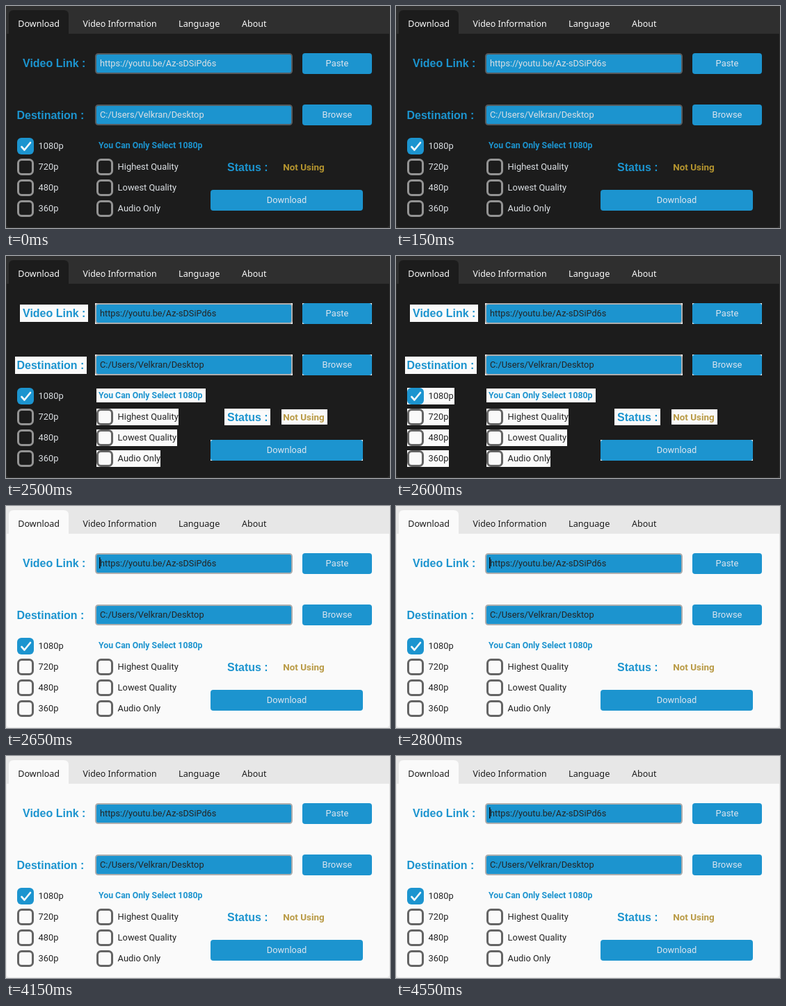
An HTML page for the animation above (4.8 s loop, 552x320 px).

```html
<!DOCTYPE html>
<html lang="en">
<head>
<meta charset="utf-8">
<title>Video downloader theme switch</title>
<style>
  html, body { margin: 0; width: 100%; height: 100%; overflow: hidden; background: #1c1c1c; }
  svg { display: block; width: 552px; height: 320px; }
  g {
    --page: #1c1c1c; --bar: #2f2f2f; --ink: #dce0e4; --tab: #fafafa;
    --edge: #565b5e; --box: #949494; --gold: #b5952f;
  }
  g.light {
    --page: #fafafa; --bar: #e7e7e7; --ink: #242424; --tab: #1c1c1c;
    --edge: #aeaeae; --box: #646464; --gold: #b99a45;
  }
  text { font-family: Roboto, sans-serif; white-space: pre; }
  .tab { font-family: "Noto Sans", sans-serif; fill: var(--tab); }
  .head { font: bold 16px "Liberation Sans", Arial, sans-serif; fill: #1c94cf; }
  .note { font-weight: bold; fill: #1c94cf; }
  .gold { font-weight: bold; fill: var(--gold); }
  .ink { fill: var(--ink); }
  .cap { fill: #dce4ee; text-anchor: middle; }
  .blue { fill: #1c94cf; }
  .page { fill: var(--page); }
  .bar { fill: var(--bar); }
  .back { fill: #fafafa; visibility: hidden; }
  .light .back { visibility: visible; }
  .light .dark { visibility: hidden; }
  .edge { fill: #1c94cf; stroke: var(--edge); stroke-width: 2; }
  .box { fill: none; stroke: var(--box); stroke-width: 3; }
  .tick { fill: none; stroke: #f4f8fb; stroke-width: 2.7; stroke-linecap: round; stroke-linejoin: round; }
</style>
</head>
<body>
<svg id="stage" viewBox="0 0 552 320"></svg>
<script>
const LOOP = 4800, LABELS = 2450, PAGE = 2650;
const stage = document.getElementById('stage');
const parts = [];

function add(parent, name, attrs, text) {
  const el = document.createElementNS('http://www.w3.org/2000/svg', name);
  for (const key in attrs) el.setAttribute(key, attrs[key]);
  if (text) el.textContent = text;
  return parent.appendChild(el);
}

// A group that turns light at the given time.
function group(at) {
  const el = add(stage, 'g', {});
  parts.push({ el, at });
  return el;
}

const rect = (g, cls, x, y, width, height, rx = 0) =>
  add(g, 'rect', { class: cls, x, y, width, height, rx });

const label = (g, cls, x, y, size, str) =>
  add(g, 'text', { class: cls, x, y, 'font-size': size }, str);

function frame() {
  const g = group(PAGE);
  rect(g, 'bar', 0, 0, 552, 320);
  add(g, 'path', { class: 'page', d: 'M1 40H551V315Q551 319 547 319H5Q1 319 1 315Z' });
  add(g, 'path', { class: 'page', d: 'M4 40V13Q4 6 11 6H83Q90 6 90 13V40Z' });
  label(g, 'tab', 17.2, 30, 12.6, 'Download');
  label(g, 'tab', 110.5, 30, 12.4, 'Video Information');
  label(g, 'tab', 248, 30, 12.7, 'Language');
  label(g, 'tab', 339, 30, 12.5, 'About');
}

function title(cls, [x, y, w, h], tx, ty, size, str) {
  const g = group(LABELS);
  rect(g, 'back', x, y, w, h);
  label(g, cls, tx, ty, size, str);
}

function entry(y, size, str) {
  const g = group(LABELS);
  rect(g, 'back', 128, y, 284, 30);
  rect(g, 'edge', 129, y + 1, 282, 28, 3.5);
  label(g, 'ink', 135, y + 19, size, str);
}

function button(x, y, w, str) {
  const g = group(LABELS);
  rect(g, 'back', x, y, w, 30);
  rect(g, 'blue', x, y, w, 30, 4);
  label(g, 'cap', x + w / 2, y + 19, 12.9, str);
}

function check(at, x, y, w, str, on) {
  const g = group(at);
  rect(g, 'back', x, y, w, 24);
  if (on) {
    rect(g, 'blue', x, y, 24, 24, 6);
    add(g, 'path', { class: 'tick', d: `M${x + 6.5} ${y + 13}l4 4.5l8.5 -10.5` });
  } else {
    rect(g, 'box', x + 1.5, y + 1.5, 21, 21, 5);
  }
  label(g, 'ink', x + 30.6, y + 16, 12.9, str);
}

frame();
title('head', [20, 70, 98, 25], 24, 88, 16, 'Video Link :');
title('head', [13, 145, 103, 25], 15.5, 163, 16, 'Destination :');
title('note', [130, 191, 157, 20], 133, 205, 12.3, 'You Can Only Select 1080p');
title('head', [314, 220, 66, 24], 318, 238, 16, 'Status :');
title('gold', [396, 221, 66, 22], 398.3, 237, 13.4, 'Not Using');

entry(68, 12.7, 'https://youtu.be/Az-sDSiPd6s');
entry(142, 12.85, 'C:/Users/Velkran/Desktop');
button(426, 68, 100, 'Paste');
button(426, 142, 100, 'Browse');
button(294, 265, 219, 'Download');

// This row repaints its background before its text.
const late = group(LABELS);
rect(late, 'back', 154, 250, 92, 24);
const strip = group(LABELS + 50);
rect(strip, 'page dark', 161, 252, 83, 18);

check(LABELS, 130, 220, 118, 'Highest Quality');
check(LABELS + 50, 130, 250, 116, 'Lowest Quality');
check(LABELS + 50, 130, 280, 92, 'Audio Only');
check(LABELS + 100, 16, 190, 68, '1080p', true);
check(LABELS + 100, 16, 220, 60, '720p');
check(LABELS + 150, 16, 250, 60, '480p');
check(LABELS + 150, 16, 280, 60, '360p');

const caret = add(stage, 'rect', { x: 134, y: 74, width: 1.5, height: 16, fill: '#101010' });
const blinks = [[2650, 3250], [3600, 4150], [4500, 4800]];

function draw() {
  const t = performance.now() % LOOP;
  for (const { el, at } of parts) el.classList.toggle('light', t >= at);
  const shown = blinks.some(([from, to]) => t >= from && t < to);
  caret.setAttribute('visibility', shown ? 'visible' : 'hidden');
  requestAnimationFrame(draw);
}
draw();
</script>
</body>
</html>
```
